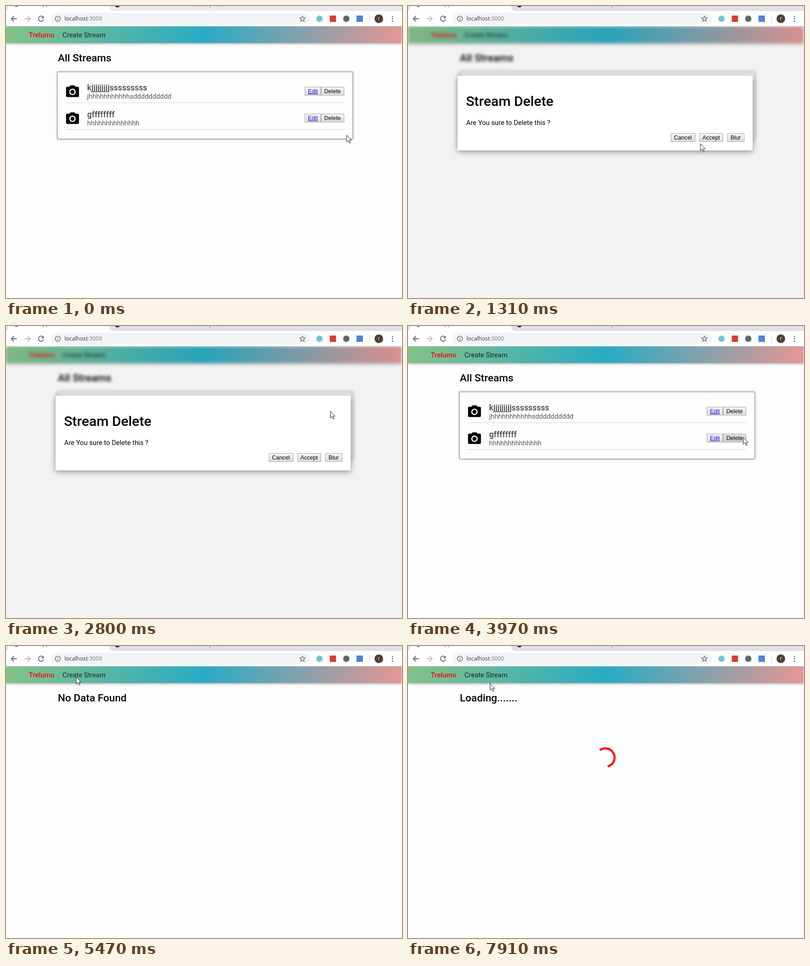
These frames come from a looping animation (871x643 px, 7990 ms). An HTML page:

```html
<!DOCTYPE html>
<html lang="en">
<head>
<meta charset="utf-8">
<title>Streams</title>
<style>
  html, body { margin: 0; width: 100%; height: 100%; overflow: hidden; background: #fdfdfd; }
  svg { display: block; }
  .page { font: 400 14.9px Roboto, sans-serif; }
  .medium { font-weight: 500; font-size: 15.2px; }
  .h1 { font-weight: 500; font-size: 30.4px; }
  .h2 { font-weight: 500; font-size: 22.8px; }
  .h3 { font-weight: 500; font-size: 17.8px; fill: #444; }
  .sub { fill: #555; }
  .btn { font: 12.6px "Liberation Sans", Arial, sans-serif; }
  .btn rect { fill: url(#face); stroke: #a3a3a3; }
  .link { fill: #1a1ad0; text-decoration: underline; }
  .list-box { fill: #fefefe; stroke: #a0a0a0; filter: drop-shadow(0 0 2px rgba(0,0,0,.5)); }
  .bar { filter: drop-shadow(0 1px 3px rgba(0,0,0,.4)); }
  .dialog-box { fill: #fff; filter: drop-shadow(0 3px 7px rgba(0,0,0,.42)); }
  .icon { fill: none; stroke: #5f6368; stroke-width: 1.8; }

  .anim { animation: 7.99s step-end infinite; }
  .strip { animation-name: strip; }
  .behind { animation-name: behind; }
  .dialog { animation-name: dialog; }
  .streams { animation-name: streams; }
  .empty { animation-name: empty; }
  .loading { animation-name: loading; }
  .hover-delete { animation-name: hover-delete; }
  .press-cancel { animation-name: press-cancel; }
  .press-accept { animation-name: press-accept; }
  .arrow { animation-name: arrow; }
  .hand { animation-name: hand; }
  .pointer { animation: pointer 7.99s linear infinite; }
  .spinner { animation: spin 7.99s linear infinite; transform-origin: 434px 245.7px; }

  @keyframes strip { 0% { fill: #e8eaed } .88%, 100% { fill: #dee1e6 } }
  @keyframes behind {
    0%, 21.28%, 43.05%, 59.57%, 100% { filter: none }
    7.51%, 34.04%, 50.69% { filter: blur(3px) }
  }
  @keyframes dialog {
    0%, 21.28%, 43.05%, 59.57%, 100% { visibility: hidden }
    7.51%, 34.04%, 50.69% { visibility: visible }
  }
  @keyframes streams { 0% { visibility: visible } 59.57%, 100% { visibility: hidden } }
  @keyframes empty { 0%, 83.22%, 100% { visibility: hidden } 59.57% { visibility: visible } }
  @keyframes loading { 0% { visibility: hidden } 83.22%, 100% { visibility: visible } }
  @keyframes hover-delete { 0%, 50.69%, 100% { opacity: 0 } 48.8% { opacity: 1 } }
  @keyframes press-cancel { 0%, 21.28%, 100% { opacity: 0 } 19.4% { opacity: 1 } }
  @keyframes press-accept { 0%, 59.57%, 100% { opacity: 0 } 57.7% { opacity: 1 } }
  @keyframes arrow { 0%, 85.7%, 100% { opacity: 1 } 80.5% { opacity: 0 } }
  @keyframes hand { 0%, 85.7%, 100% { opacity: 0 } 80.5% { opacity: 1 } }
  @keyframes pointer {
    0%, .88% { transform: translate(749px, 284px) }
    6.3%, 12.5% { transform: translate(722px, 189px) }
    16.4% { transform: translate(643px, 303px) }
    17.4% { transform: translate(622px, 306px) }
    19.4%, 21.28% { transform: translate(604px, 289px) }
    26.2%, 28.2% { transform: translate(690px, 220px) }
    32%, 35.1% { transform: translate(713px, 187px) }
    38%, 39% { transform: translate(640px, 270px) }
    41%, 43.05% { transform: translate(604px, 289px) }
    48.8%, 50.7% { transform: translate(737px, 245px) }
    55.7%, 59.57% { transform: translate(662px, 288px) }
    68.4%, 73.3% { transform: translate(154px, 68px) }
    77% { transform: translate(308px, 140px) }
    81.2%, 84.2% { transform: translate(85px, 78px) }
    89.2% { transform: translate(200px, 62px) }
    92.2%, 93.2% { transform: translate(130px, 60px) }
    99%, 100% { transform: translate(180px, 82px) }
  }
  @keyframes spin {
    0%, 83.22% { transform: rotate(-132deg); stroke-dasharray: 180 180 }
    99% { transform: rotate(233deg); stroke-dasharray: 202 158 }
    100% { transform: rotate(256deg); stroke-dasharray: 203 157 }
  }
</style>
</head>
<body>
<svg width="871" height="643" viewBox="0 0 871 643">
  <defs>
    <linearGradient id="nav" gradientUnits="userSpaceOnUse" x1="9" y1="-12" x2="861" y2="138">
      <stop stop-color="#86c187"/><stop offset=".5" stop-color="#2aabc3"/><stop offset="1" stop-color="#e69694"/>
    </linearGradient>
    <linearGradient id="face" x2="0" y2="1">
      <stop stop-color="#f6f6f6"/><stop offset="1" stop-color="#dddddd"/>
    </linearGradient>
    <path id="camera" transform="translate(129.2 172) scale(1.42)" fill-rule="evenodd"
      d="M9 2 7.2 4H4a2 2 0 0 0-2 2v12a2 2 0 0 0 2 2h16a2 2 0 0 0 2-2V6a2 2 0 0 0-2-2h-3.2L15 2ZM12 7a5 5 0 0 1 0 10 5 5 0 0 1 0-10Zm0 1.8a3.2 3.2 0 0 0 0 6.4 3.2 3.2 0 0 0 0-6.4Z"/>
    <g id="row">
      <use href="#camera"/>
      <path d="M132 213H744" stroke="#dedede" stroke-width="1.6"/>
      <g class="btn">
        <rect x="657.5" y="178.5" width="35" height="18"/>
        <rect x="693.5" y="178.5" width="50" height="18"/>
        <text class="link" x="664" y="192">Edit</text>
        <text x="700" y="192">Delete</text>
      </g>
    </g>
  </defs>

  <rect width="871" height="643" fill="#fdfdfd"/>

  <g class="page">
    <g class="anim behind">
      <rect class="bar" y="45" width="870" height="36.5" fill="url(#nav)"/>
      <text class="medium" x="50" y="69" fill="#f80808">Trelumo</text>
      <text x="124.3" y="69" fill="#1c2426">Create Stream</text>
      <g class="anim streams">
        <text class="h2" x="114" y="121.5">All Streams</text>
        <rect class="list-box" x="113.5" y="145.5" width="649" height="147"/>
        <use href="#row"/>
        <use href="#row" y="59.3"/>
        <text class="h3" x="178.5" y="185.5">kjjjjjjjjjsssssssss</text>
        <text class="sub" x="178.5" y="204">jhhhhhhhhhhhsdddddddddd</text>
        <text class="h3" x="178.5" y="244.5">gffffffff</text>
        <text class="sub" x="178.5" y="263">hhhhhhhhhhhhhh</text>
        <rect class="anim hover-delete" x="694" y="238" width="49" height="18" fill="#000" fill-opacity=".08"/>
      </g>
      <text class="h2 anim empty" x="114" y="121.5">No Data Found</text>
      <g class="anim loading">
        <text class="h2" x="114" y="121.5">Loading.......</text>
        <path class="spinner" d="M454.3 245.7a20.3 20.3 0 0 1-40.6 0a20.3 20.3 0 0 1 40.6 0" pathLength="360"
          fill="none" stroke="#f00" stroke-width="4.6"/>
      </g>
    </g>

    <g class="anim dialog">
      <rect y="44" width="871" height="599" fill-opacity=".045"/>
      <rect class="dialog-box" x="109" y="153.5" width="649" height="164.5" rx="3"/>
      <text class="h1" x="127.5" y="219.5">Stream Delete</text>
      <text x="128" y="261.5">Are You sure to Delete this ?</text>
      <g class="btn">
        <rect x="578.5" y="280.5" width="53" height="18"/>
        <rect x="641.5" y="280.5" width="51" height="18"/>
        <rect x="702.5" y="280.5" width="37" height="18"/>
        <text x="585" y="294">Cancel</text>
        <text x="647.5" y="294">Accept</text>
        <text x="709.5" y="294">Blur</text>
      </g>
      <g fill-opacity=".1">
        <path class="anim press-cancel" d="M578 280h54v19h-54z"/>
        <path class="anim press-accept" d="M641 280h52v19h-52z"/>
      </g>
    </g>
  </g>
  <path d="M870.5 45V643" stroke="#e2e2e4"/>

  <!-- browser toolbar -->
  <rect width="871" height="44.5" fill="#fff"/>
  <path class="anim strip" d="M227 0H871V11H236Q227 11 227 0ZM0 0H5Q5 9 0 11Z"/>
  <circle cx="23" cy="-3" r="5" fill="#666"/>
  <circle cx="245" cy="-3" r="6" fill="#222"/>
  <text x="39" y="-.5" font-family="Open Sans, sans-serif" font-size="12" fill="#5f5a40">React App</text>
  <path d="M448.5 0V5" stroke="#8b8f94"/>
  <path d="M414 0h2M430 0h2M467 0h3" stroke="#888" stroke-width="1.5"/>
  <path d="M0 44.5H871" stroke="#dcdee0"/>
  <g class="icon">
    <path d="M24 28H12M17.5 22 11.7 28l5.8 6"/>
    <path d="M41 28H53M47.500 22 53.300 28l-5.800 6" stroke="#b9bbbe"/>
    <path d="M81.500 24.200A5.700 5.700 0 1 0 82.600 29.500"/>
    <path d="M83 21.500V27H77.500Z" fill="#5f6368" stroke="none"/>
  </g>
  <rect x="98" y="15" width="570" height="26" rx="13" fill="#f1f3f4"/>
  <g class="icon" style="stroke-width:1.3">
    <circle cx="114" cy="28" r="5.700"/>
    <path d="M114 27v4M114 24.300v1.500"/>
    <path d="m652 22 1.800 4 4.300.4-3.300 2.900 1 4.300-3.800-2.300-3.800 2.300 1-4.300-3.300-2.900 4.300-.4Z"/>
  </g>
  <text x="128.500" y="32.200" font-family="Open Sans, sans-serif" font-size="12.300" fill="#303338">localhost<tspan fill="#777b80">:3000</tspan></text>
  <circle cx="689.500" cy="28" r="7" fill="#70c9d2"/>
  <rect x="712" y="21" width="14" height="14" fill="#d8412f"/>
  <circle cx="748.500" cy="28" r="7" fill="#62666a"/>
  <rect x="771" y="21" width="14" height="14" fill="#4d83d8"/>
  <path d="M799.500 20V36" stroke="#d0d3d7"/>
  <circle cx="820" cy="28" r="9.500" fill="#533d36"/>
  <text x="820" y="31" text-anchor="middle" font-family="Roboto, sans-serif" font-size="10" fill="#fff">r</text>
  <g fill="#5f6368"><circle cx="850" cy="23" r="1.500"/><circle cx="850" cy="28" r="1.500"/><circle cx="850" cy="33" r="1.500"/></g>

  <g class="pointer" fill="#fff" stroke="#1c1c28" stroke-linejoin="round">
    <path class="anim arrow" d="M.500.500V15.500L4 12.300 6.500 18 8.800 17 6.300 11.500H11Z"/>
    <path class="anim hand" d="M-1 11V1.500Q-1-.5.500-.5T2 1.500V7Q4 5.500 5 7.500 7 6.500 7.500 8.500 9.500 8 9.500 10V14Q9 16 8 17.500V20H-.5V18Q-3 15-5 12.500-4.500 9-1 12Z"/>
  </g>
</svg>
</body>
</html>
```
